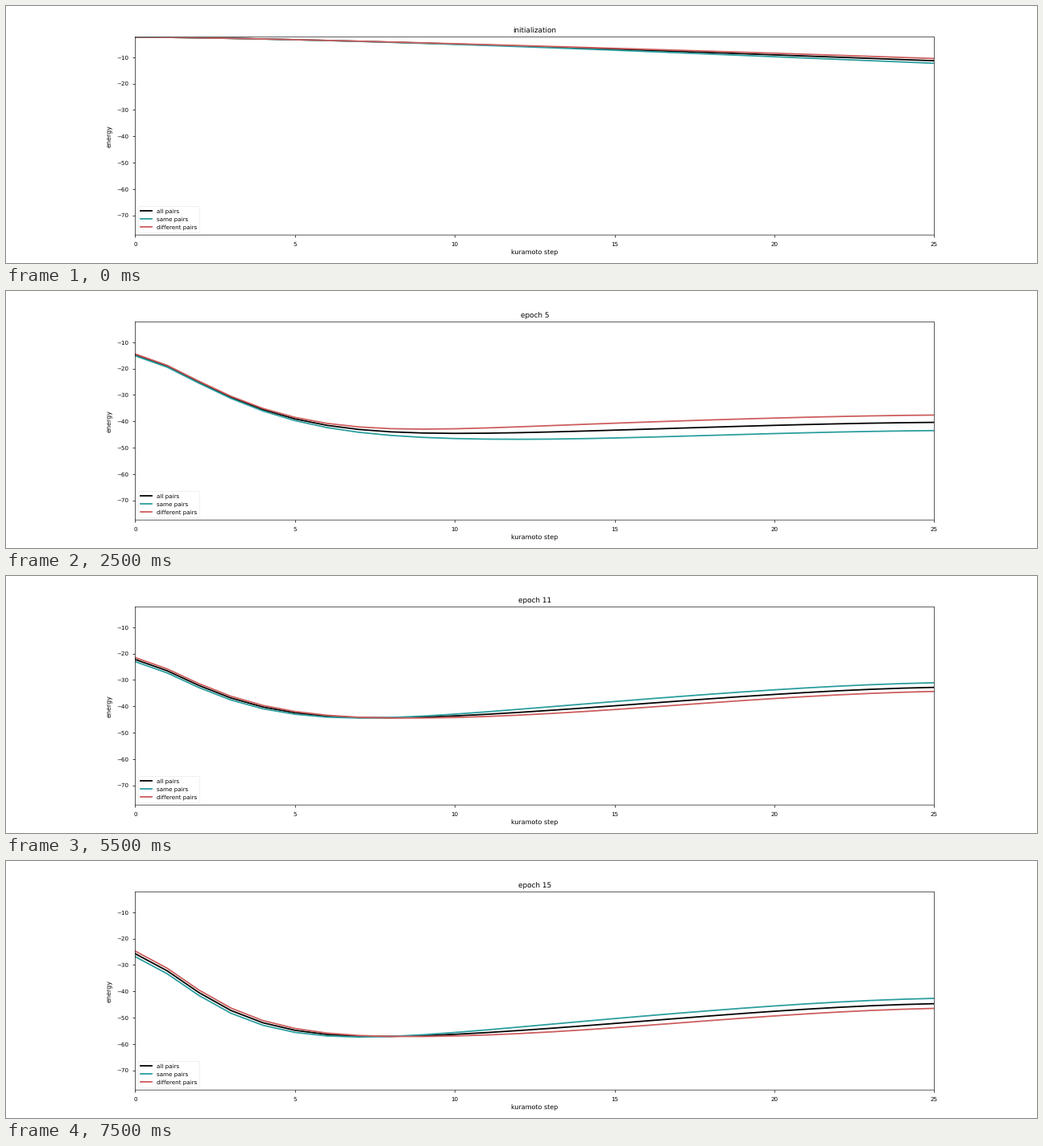
Write a matplotlib script that moves like this. It is 1280 px wide and 320 px high and loops after 8000 ms.

```python
import numpy as np
import matplotlib.pyplot as plt
from matplotlib.animation import FuncAnimation

plt.rcParams.update({
    "font.family": "DejaVu Sans",
    "text.hinting": "none",
    "axes.titlesize": 10,
    "axes.titlepad": 6.5,
    "axes.labelsize": 9,
    "axes.linewidth": 0.72,
    "xtick.labelsize": 8,
    "ytick.labelsize": 8,
    "xtick.major.pad": 5.5,
    "ytick.major.pad": 5.5,
    "legend.fontsize": 8,
})

EPOCHS = 16
LAST = 25
STEPS = np.arange(LAST + 1)

# epoch: start, floor, decay time, late drift, final gap (different - same)
KEYS = {
    0: (-2.3, -39, 60, 0, 1.8),
    2: (-4.1, -8.2, 4.8, -3.2, -3.7),
    3: (-7.5, -38, 5, -6, 3),
    4: (-11.5, -37.2, 3.75, 10.9, 4),
    7: (-21.2, -62.6, 3.6, -6, 9.7),
    9: (-20.5, -42, 3.3, 9, -2),
    11: (-22.2, -45.2, 2.97, 12.4, -3.3),
    12: (-24.5, -60.8, 2.8, 15, -4),
    13: (-26.9, -58, 2.6, 17.6, -4.5),
    14: (-26.3, -67.5, 2.8, 14, -4),
    15: (-25.7, -58, 2.8, 13.3, -3.8),
}


def saturate(x, tau, power):
    return 1 - np.exp(-(x / tau) ** power)


def smoothstep(x, begin, length):
    u = np.clip((x - begin) / length, 0, 1)
    return u * u * (3 - 2 * u)


def energies(epoch):
    """Energy curves for all, same and different pairs."""
    start, floor, tau, drift, end_gap = (
        np.interp(epoch, list(KEYS), column) for column in zip(*KEYS.values()))

    # quick relaxation to the floor, then a slow drift away from it
    late = smoothstep(STEPS, 5.5, 21) / smoothstep(LAST, 5.5, 21)
    mean = start + (floor - start) * saturate(STEPS, tau, 1.45) + drift * late

    # pairs separate earlier when the energy climbs back
    lag = 10.5 if drift > 0 else 20
    spread = saturate(STEPS, lag, 3) / saturate(LAST, lag, 3)
    start_gap = 0.14 * epoch
    gap = start_gap + (end_gap - start_gap) * spread
    return mean, mean - 0.53 * gap, mean + 0.47 * gap


fig, ax = plt.subplots(figsize=(20, 5), dpi=64)
fig.subplots_adjust(left=0.12525, right=0.90025, bottom=0.109, top=0.879)
ax.set(xlim=(0, LAST), ylim=(-77.5, -2.3))
ax.set_xlabel("kuramoto step", labelpad=3)
ax.set_ylabel("energy", labelpad=5)
ax.set_xticks(range(0, LAST + 1, 5))
ax.set_yticks(range(-70, 0, 10))
for spine in ax.spines.values():
    spine.set_snap(False)

series = [("all pairs", "black"), ("same pairs", "#2a9d9f"),
          ("different pairs", "#cd5c5c")]
lines = [ax.plot([], [], color=color, lw=2, label=label)[0]
         for label, color in series]
ax.legend(loc="lower left", labelspacing=0.44, edgecolor="0.92")
title = ax.set_title("initialization")


def update(epoch):
    for line, energy in zip(lines, energies(epoch)):
        line.set_data(STEPS, energy)
    title.set_text(f"epoch {epoch}" if epoch else "initialization")
    return [*lines, title]


anim = FuncAnimation(fig, update, frames=EPOCHS, interval=500, repeat=True,
                     repeat_delay=0, blit=False)
plt.show()
```
